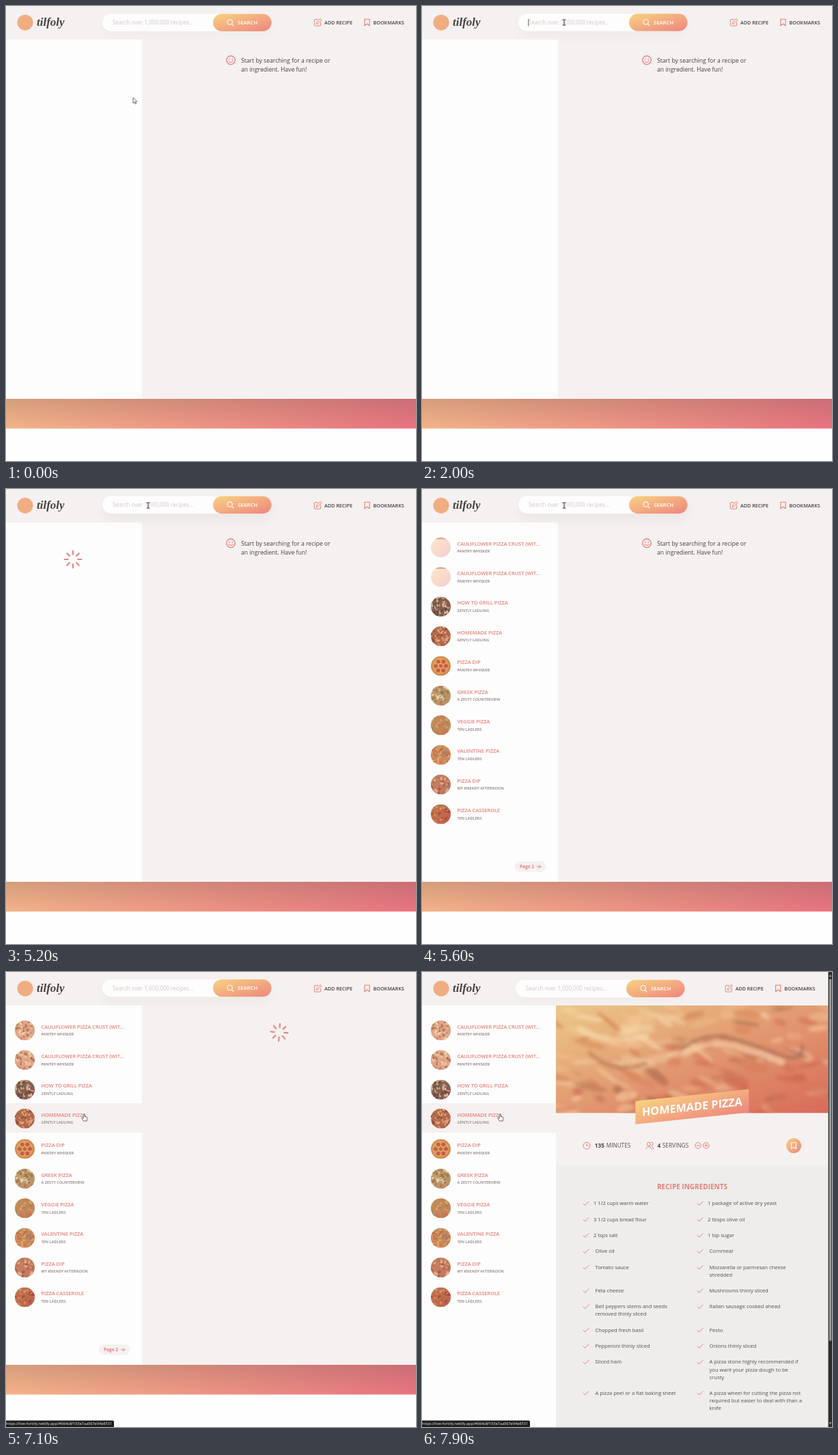
An HTML page with a canvas that plays this animation: 600 by 666 pixels, repeating every 8 s.

```html
<!DOCTYPE html>
<html lang="en">
<head>
<meta charset="utf-8">
<title>Recipe search</title>
<style>
html, body { margin: 0; width: 100%; height: 100%; overflow: hidden; background: #fefefe; }
canvas { display: block; }
</style>
</head>
<body>
<canvas id="stage" width="600" height="666"></canvas>
<script>
const ctx = document.getElementById('stage').getContext('2d');
const LOOP = 8000, STEP = 100, TAU = Math.PI * 2;
const SANS = '"Open Sans", "Noto Sans", sans-serif';
const C = {
  bg: '#f5f1f0', panel: '#fefdfe', deep: '#eeedeb', dark: '#48403d', text: '#564c49',
  grey: '#8a7e7a', faint: '#d0c6c3', accent: '#e38079', yellow: '#f8d281', pink: '#ee857f'
};
const ROW_TOP = 62.8, ROW_H = 43.4;

// title, publisher, base tone, topping tones
const recipes = [
  ['CAULIFLOWER PIZZA CRUST (WIT...', 'PANTRY WHISKER', '#d9a689', ['#c4705c', '#f0d6b8', '#9b6552']],
  ['CAULIFLOWER PIZZA CRUST (WIT...', 'PANTRY WHISKER', '#d9a689', ['#c4705c', '#f0d6b8', '#9b6552']],
  ['HOW TO GRILL PIZZA', 'GENTLY LADLING', '#6b4b43', ['#c89a80', '#3d302d', '#d8bea0']],
  ['HOMEMADE PIZZA', 'GENTLY LADLING', '#a3583f', ['#e3b288', '#7d3229', '#d5925f']],
  ['PIZZA DIP', 'PANTRY WHISKER', '#dc9a55', ['#b64a38']],
  ['GREEK PIZZA', 'A ZESTY COUNTERVIEW', '#ad9160', ['#e6dcb8', '#6c7545', '#b0634c']],
  ['VEGGIE PIZZA', 'TEN LADLERS', '#b47f4e', ['#8a7c45', '#c06a48', '#cda064']],
  ['VALENTINE PIZZA', 'TEN LADLERS', '#c4814f', ['#b2553d', '#e2a869', '#8d7a68']],
  ['PIZZA DIP', 'MY KNEADY AFTERNOON', '#bb7057', ['#e0b295', '#a44638', '#8c7650']],
  ['PIZZA CASSEROLE', 'TEN LADLERS', '#b8573f', ['#d88a5c', '#858048', '#96372e']]
];

// centre of first line, then left and right text; a leading "~" marks an item without quantity
const ingredients = [
  [338.5, '1 1/2 cups warm water', '1 package of active dry yeast'],
  [362, '3 1/2 cups bread flour', '2 tbsps olive oil'],
  [385.2, '2 tsps salt', '1 tsp sugar'],
  [408.5, '~Olive oil', '~Cornmeal'],
  [432, '~Tomato sauce', '~Mozzarella or parmesan cheese|shredded'],
  [466.3, '~Feta cheese', '~Mushrooms thinly sliced'],
  [489.6, '~Bell peppers stems and seeds|removed thinly sliced', '~Italian sausage cooked ahead'],
  [524, '~Chopped fresh basil', '~Pesto'],
  [547.4, '~Pepperoni thinly sliced', '~Onions thinly sliced'],
  [570.8, '~Sliced ham', '~A pizza stone highly recommended if|you want your pizza dough to be|crusty'],
  [616, '~A pizza peel or a flat baking sheet', '~A pizza wheel for cutting the pizza not|required but easier to deal with than a|knife']
];

// time, hotspot x, y
const cursorPath = [
  [0, 186, 134], [100, 186, 134], [1700, 208, 24], [5900, 208, 24],
  [6200, 87, 249], [6400, 87, 251], [6800, 114, 208], [8000, 114, 208]
];

const clamp = v => Math.max(0, Math.min(1, v));
const ease = v => v * v * (3 - 2 * v);

function random(seed) {
  return () => (seed = (seed * 16807) % 2147483647) / 2147483647;
}

function text(str, x, yc, size, color, weight = 400, align = 'left') {
  ctx.font = `${weight} ${size}px ${SANS}`;
  ctx.fillStyle = color;
  ctx.textAlign = align;
  ctx.fillText(str, x, yc + size * 0.355);
}

function box(x, y, w, h, fill) {
  ctx.fillStyle = fill;
  ctx.fillRect(x, y, w, h);
}

function pill(x, y, w, h, fill, r = h / 2) {
  ctx.fillStyle = fill;
  ctx.beginPath();
  ctx.roundRect(x, y, w, h, r);
  ctx.fill();
}

function disc(x, y, r, fill) {
  ctx.fillStyle = fill;
  ctx.beginPath();
  ctx.arc(x, y, r, 0, TAU);
  ctx.fill();
}

function blob(x, y, rx, ry, angle, fill) {
  ctx.fillStyle = fill;
  ctx.beginPath();
  ctx.ellipse(x, y, rx, ry, angle, 0, TAU);
  ctx.fill();
}

function ring(x, y, r, color = C.accent, width = 1) {
  ctx.strokeStyle = color;
  ctx.lineWidth = width;
  ctx.beginPath();
  ctx.arc(x, y, r, 0, TAU);
  ctx.stroke();
}

function line(path, x, y, color = C.accent, width = 1) {
  ctx.save();
  ctx.translate(x, y);
  ctx.strokeStyle = color;
  ctx.lineWidth = width;
  ctx.lineCap = ctx.lineJoin = 'round';
  ctx.stroke(new Path2D(path));
  ctx.restore();
}

function gradient(x0, y0, x1, y1, from, to) {
  const g = ctx.createLinearGradient(x0, y0, x1, y1);
  g.addColorStop(0, from);
  g.addColorStop(1, to);
  return g;
}

// matches a CSS "to bottom right" gradient
function diagonal(x, y, w, h, from = C.yellow, to = C.pink) {
  const k = w * h / (w * w + h * h), cx = x + w / 2, cy = y + h / 2;
  return gradient(cx - h * k, cy - w * k, cx + h * k, cy + w * k, from, to);
}

function cursorAt(t) {
  const i = Math.max(1, cursorPath.findIndex(p => p[0] > t));
  const [t0, x0, y0] = cursorPath[i - 1], [t1, x1, y1] = cursorPath[i];
  const k = ease(clamp((t - t0) / (t1 - t0)));
  return [x0 + (x1 - x0) * k, y0 + (y1 - y0) * k];
}

function hoveredRow(t) {
  const [x, y] = cursorAt(t);
  return t >= 5500 && x < 199 ? Math.floor((y - ROW_TOP) / ROW_H) : -1;
}

function hoverAmount(row, t) {
  return [0, 100, 200].filter(d => hoveredRow(t - d) === row).length / 3;
}

function bookmark(x, y, color, s = 1) {
  line(`M${-3.6 * s} ${-4.8 * s}H${3.6 * s}V${4.8 * s}L0 ${2 * s}L${-3.6 * s} ${4.8 * s}Z`, x, y, color, 1.1);
}

function header(t, narrow) {
  box(0, 0, 600, 49, C.bg);
  disc(28, 24.2, 11.5, '#f1ad82');
  ctx.font = 'italic 700 17px "Liberation Serif", serif';
  ctx.fillStyle = C.dark;
  ctx.textAlign = 'left';
  ctx.fillText('tilfoly', 45, 29);

  const lift = clamp((t - 1900) / 300) - clamp((t - 7000) / 300);
  ctx.save();
  ctx.translate(narrow ? -4 : 0, -lift);
  ctx.shadowColor = `rgba(97,85,81,${0.03 + 0.04 * lift})`;
  ctx.shadowBlur = 16;
  ctx.shadowOffsetY = 6 + 3 * lift;
  pill(141, 11.5, 247.5, 25.5, '#fefdfd');
  ctx.shadowColor = 'transparent';
  pill(303, 11.5, 85.5, 25.5, diagonal(303, 11.5, 85.5, 25.5));
  ring(327.6, 23.6, 3.7, '#fff', 1.1);
  line('M0 0L2.6 2.6', 330.4, 26.4, '#fff', 1.1);
  text('SEARCH', 339, 24.4, 7.7, '#fff', 600);

  const typed = t < 3400 || t >= 4800 ? '' : t < 4000 ? 'p' : t < 4100 ? 'pi' : t < 4500 ? 'pizz' : 'pizza';
  if (typed) text(typed, 156, 24.4, 8.15, C.text);
  else text('Search over 1,000,000 recipes...', 156, 24.4, 8.15, C.faint);
  if (typed || (t >= 2000 && t < 2300)) {
    ctx.font = `400 8.15px ${SANS}`;
    box(155.4 + ctx.measureText(typed).width, 19, 0.8, 11, C.dark);
  }
  ctx.restore();

  ctx.save();
  ctx.translate(narrow ? -7.3 : 0, 0);
  line('M0 -4.3H-4.1Q-5.2 -4.3 -5.2 -3.2V4Q-5.2 5.1 -4.1 5.1H3Q4.1 5.1 4.1 4V0', 456.5, 24);
  line('M-2 2.1L-1.6 -.4L3.6 -5.4L5.3 -3.7L.3 1.5Z', 456.5, 24);
  text('ADD RECIPE', 466, 24.3, 7.2, C.dark, 600);
  bookmark(528.4, 24, C.accent);
  text('BOOKMARKS', 537.5, 24.3, 7.2, C.dark, 600);
  ctx.restore();
}

function spinner(x, y, degrees) {
  ctx.save();
  ctx.translate(x, y);
  ctx.rotate(degrees * Math.PI / 180);
  for (let i = 0; i < 8; i++) {
    line('M7.2 0H12.4', 0, 0, '#e28983', 2.2);
    ctx.rotate(TAU / 8);
  }
  ctx.restore();
}

function thumbnail(i, y, loaded) {
  const [, , base, tones] = recipes[i], r = 14.5, x = 27.5, d = 2 * r;
  ctx.save();
  ctx.beginPath();
  ctx.arc(x, y, r, 0, TAU);
  ctx.clip();
  if (loaded) {
    box(x - r, y - r, d, d, base);
    if (i === 4) {
      ring(x, y, 13, '#c7803f', 2);
      for (let k = 0; k < 6; k++) disc(x + 7.5 * Math.cos(k * 1.05), y + 7.5 * Math.sin(k * 1.05), 2.8, tones[0]);
      disc(x, y, 2.5, tones[0]);
    } else {
      const rnd = random(97 + i * 311), spread = () => (rnd() - 0.5) * 28;
      for (let k = 0; k < 45; k++) {
        blob(x + spread(), y + spread(), 1 + rnd() * 2.4, 0.6 + rnd() * 1.1, rnd() * 3, tones[k % tones.length]);
      }
    }
    ctx.globalAlpha = 0.2;
    box(x - r, y - r, d, d, diagonal(x - r, y - r, d, d));
  } else {
    box(x - r, y - r, d, d, diagonal(x - r, y - r, d, d, '#fbeacb', '#f5cbcb'));
    box(x - r, y - r, d, 2.5, base);
  }
  ctx.restore();
}

function results(t) {
  recipes.forEach(([title, publisher], i) => {
    const top = ROW_TOP + i * ROW_H, h = hoverAmount(i, t), y = top - h;
    if (h) {
      ctx.globalAlpha = h;
      box(0, y, t >= 7800 ? 196 : 199, ROW_H, C.bg);
      ctx.globalAlpha = 1;
    }
    thumbnail(i, y + 22.6, t >= (i < 2 ? 6500 : 5600));
    text(title, 51.5, y + 17.1, 7.4, C.accent, 600);
    text(publisher, 51.5, y + 28.3, 5.65, C.grey, 600);
  });
}

function searchPage(t) {
  box(0, 49, 199, 526, C.panel);
  box(199, 49, 401, 526, C.bg);
  box(0, 575, 600, 43.5, gradient(0, 575, 580, 660, '#f4b389', '#e8757f'));
  box(0, 575, 600, 43.5, gradient(0, 575, 0, 618, 'rgba(97,85,81,.22)', 'rgba(97,85,81,0)'));

  if (t >= 4800 && t < 5500) spinner(98, 103, (t - 5200) * 0.18);
  if (t >= 5500) {
    results(t);
    pill(135.5, 545, 46, 15.5, C.bg);
    text('Page 2', 143, 552.8, 6.5, C.accent, 700);
    line('M-2.7 0H2.7M.5 -2.2L2.7 0L.5 2.2', 171, 552.8);
  }
  if (t < 7100) {
    ring(329, 79.3, 6.3, C.accent, 1.3);
    disc(326.8, 77.8, 0.9, C.accent);
    disc(331.2, 77.8, 0.9, C.accent);
    line('M-3 1.6Q0 4.8 3 1.6', 329, 79.3, C.accent, 1.1);
    text('Start by searching for a recipe or', 344, 79.6, 8.65, C.dark, 500);
    text('an ingredient. Have fun!', 344, 93.3, 8.65, C.dark, 500);
  } else {
    spinner(400, 88.3, 22 + (t - 7700) * 0.18);
  }
}

function photo() {
  const x = 196, y = 49, w = 398.5, h = 157.5, rnd = random(4242);
  const cheese = ['#f6e6c4', '#f0cfa0', '#ecc196'], sauce = ['#b5452f', '#c8663f', '#8e4a33'];
  ctx.save();
  ctx.beginPath();
  ctx.rect(x, y, w, h);
  ctx.clip();
  box(x, y, w, h, diagonal(x, y, w, h, '#e3c08c', '#c9583f'));
  ctx.filter = 'blur(2.5px)';
  for (let k = 0; k < 130; k++) {
    // cheese thins out and sauce shows toward the lower right
    const u = rnd(), v = rnd(), tones = rnd() < 0.85 - 0.3 * (u + v) ? cheese : sauce;
    ctx.globalAlpha = 0.4 + rnd() * 0.35;
    blob(x + u * w, y + v * h, 6 + rnd() * 20, 2.5 + rnd() * 5, 0.2 + (rnd() - 0.5), tones[k % 3]);
  }
  ctx.globalAlpha = 0.7;
  line('M0 12Q35 -14 76 -2T150 24Q180 30 176 8', 380, 100, '#70483a', 5);
  line('M4 20Q40 -2 76 8T146 32', 380, 100, '#f3dfbd', 9);
  line('M0 0Q35 34 82 16', 245, 118, '#84503a', 5);
  line('M0 0Q40 24 96 10', 232, 84, '#f6e6c4', 10);
  ctx.filter = 'none';
  ctx.globalAlpha = 0.4;
  box(x, y, w, h, diagonal(x, y, w, h));
  ctx.restore();
}

function recipePage(t) {
  box(0, 49, 196, 617, C.panel);
  box(196, 206, 398.5, 77, C.bg);
  box(196, 282.5, 398.5, 383.5, C.deep);
  results(t);
  photo();

  ctx.save();
  ctx.transform(1, -Math.tan(Math.PI / 30), 0, 1, 395.3, 197.3);
  box(-83, -17, 166, 34, diagonal(-83, -17, 166, 34));
  text('HOMEMADE PIZZA', 0, 0, 16.2, '#fff', 700, 'center');
  ctx.restore();

  ring(241, 254.2, 5);
  line('M0 -2.8V0H2.4', 241, 254.2);
  text('135', 252.8, 254.2, 8.2, C.dark, 700);
  text('MINUTES', 269.8, 254.2, 8.2, C.text);
  ring(331.8, 251.9, 2.6);
  line('M-5 5Q-4.2 1.6 -1 1.6T3.2 5M2.8 -5A2.6 2.6 0 0 1 2.8 .2M3.8 1.8Q5.4 2.4 6 5', 332.8, 254);
  text('4', 344.5, 254.2, 8.2, C.dark, 700);
  text('SERVINGS', 351.8, 254.2, 8.3, C.text);
  for (const x of [404, 415.8]) {
    ring(x, 254, 4.3);
    line(x < 410 ? 'M-2 0H2' : 'M-2 0H2M0 -2V2', x, 254);
  }
  disc(544, 254.3, 11, diagonal(533, 243, 22, 22));
  bookmark(544, 254.3, '#fff', 0.95);

  text('RECIPE INGREDIENTS', 395.5, 314, 10, C.accent, 700, 'center');
  for (const [y, ...pair] of ingredients) {
    pair.forEach((item, col) => {
      const x = 236 + col * 167;
      line('M0 0L2.6 2.6L8 -2.8', x, y + 0.4, C.accent, 1);
      const indent = item[0] === '~' ? 17.5 : 15;
      item.replace('~', '').split('|').forEach((row, k) => text(row, x + indent, y + k * 11.2, 7.6, C.text));
    });
  }
}

function scrollbar() {
  box(594.5, 0, 5.5, 666, '#2c2c2c');
  pill(595.8, 10, 3.4, 530, '#9b9b9b');
  ctx.fill(new Path2D('M595.6 7L597.5 3.5L599.4 7ZM595.6 659L597.5 662.5L599.4 659Z'));
}

function pointer(t) {
  const [x, y] = cursorAt(t);
  if (x > 141 && x < 303 && y > 11 && y < 37) {
    line('M-2 -4H-.5Q0 -4 0 -3.4V3.4Q0 4 .5 4H2M2 -4H.5M-2 4H-.5', x, y, '#3c3a3a', 1.1);
    return;
  }
  const hand = hoveredRow(t) >= 0;
  const shape = new Path2D(hand
    ? 'M-.9 .6Q0 -.6 .9 .6V3.4L4.6 4.3Q5.4 4.6 5.2 5.6L4.5 8.2V10H-.5L-3.3 6.2Q-3.4 5 -2.2 5.3L-.9 6.3Z'
    : 'M0 0V8.3L2 6.5L3.3 9.4L4.6 8.8L3.3 6H5.8Z');
  ctx.save();
  ctx.translate(x, y);
  ctx.fillStyle = '#fff';
  ctx.strokeStyle = '#4b4848';
  ctx.lineWidth = 0.8;
  ctx.lineJoin = 'round';
  ctx.fill(shape);
  ctx.stroke(shape);
  ctx.restore();
}

function draw(t) {
  const open = t >= 7800;
  box(0, 0, 600, 666, '#fefefe');
  (open ? recipePage : searchPage)(t);
  header(t, open);
  if (open) scrollbar();
  if (t >= 6900) {
    pill(0, 656.5, 158, 10, '#1f1e1f', [0, 2, 0, 0]);
    text('https://live-forkify.netlify.app/#664c8f193e7aa067e94e8531', 0, 661.5, 5.6, '#eee');
  }
  pointer(t);
}

function tick() {
  draw(Math.floor((performance.now() % LOOP) / STEP) * STEP);
  requestAnimationFrame(tick);
}
tick();
</script>
</body>
</html>
```
